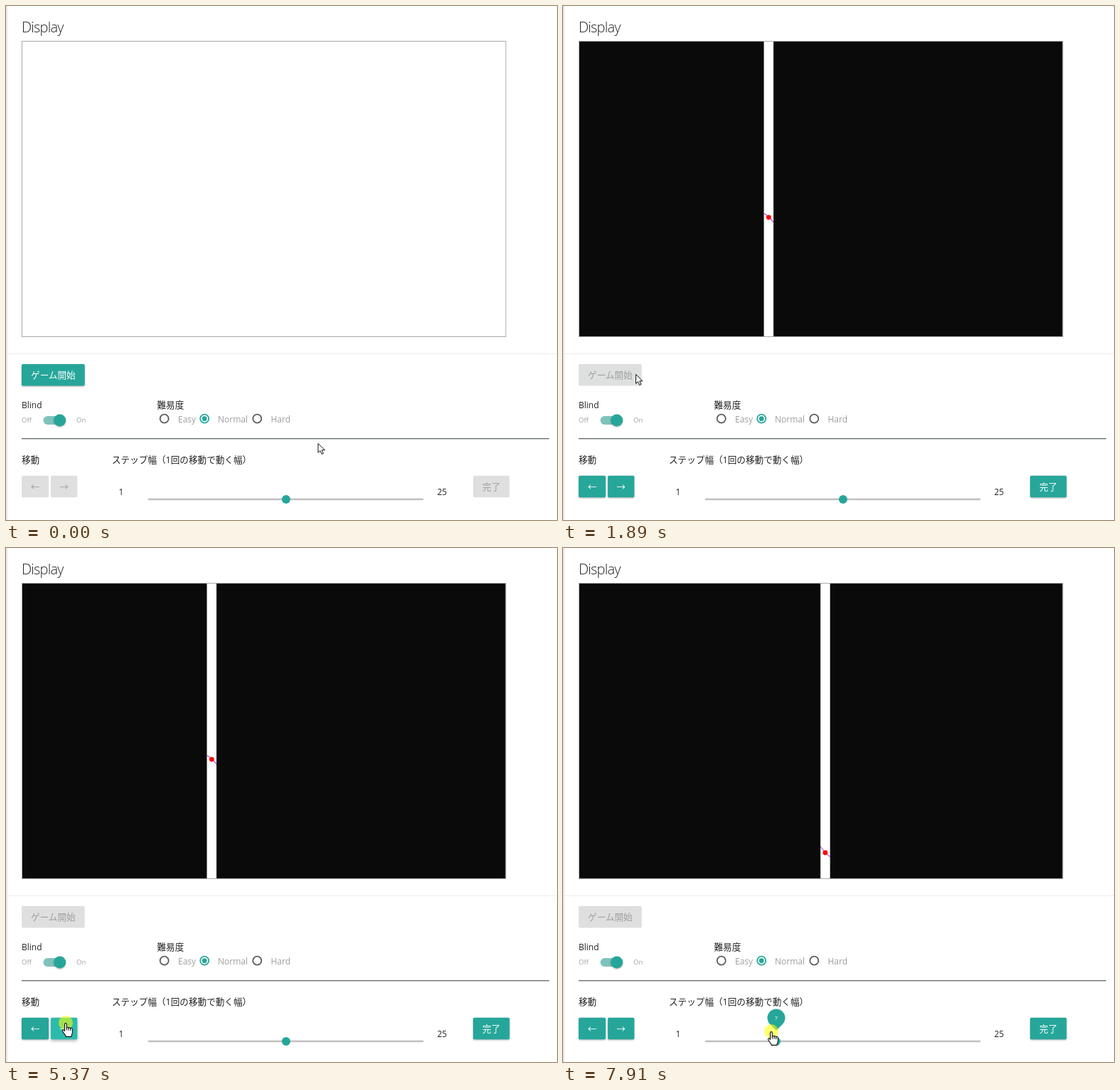
Recreate the animation shown at these times as an HTML page. Size 775x722 px, loop 8 s.

```html
<!DOCTYPE html>
<html lang="ja">
<head>
<meta charset="utf-8">
<title>Display</title>
<style>
html, body { margin: 0; width: 100%; height: 100%; overflow: hidden; background: #fff; }
svg { display: block; width: 100%; height: 100%; }
text { font: 12px "Open Sans", "Noto Sans CJK JP", "Noto Sans CJK", sans-serif; fill: #222; white-space: pre; }
text.jp { font-family: "Noto Sans CJK JP", "Noto Sans CJK", sans-serif; font-size: 12.6px; }
text.head { font-size: 20px; font-weight: 300; letter-spacing: -.8px; }
text.mid { text-anchor: middle; }
text.dim { fill: #9e9e9e; }
text.tiny { font-size: 9.5px; }
text.tip { font-size: 7.5px; fill: #fff; }
</style>
</head>
<body>
<svg viewBox="0 0 775 722" id="stage">
  <defs>
    <clipPath id="slit"><rect x="-6.75" y="50" width="13.5" height="414"/></clipPath>
  </defs>
  <rect width="775" height="722" fill="#fff"/>
  <rect width="2" height="722" fill="#e6e6e6"/>
  <rect x="2" y="488" width="773" height="1" fill="#ebebeb"/>
  <text class="head" x="22" y="37">Display</text>
  <rect x="22.5" y="49.5" width="680.5" height="415" fill="#fff" stroke="#a9a9a9"/>

  <g id="game">
    <rect x="23" y="50" width="679.5" height="414" fill="#0a0a0a"/>
    <g id="view">
      <rect x="-6.75" y="50" width="13.5" height="414" fill="#fff"/>
      <path id="curve" fill="none" stroke="#c23be0" stroke-width="1.2" clip-path="url(#slit)"/>
      <circle id="dot" r="3.4" fill="#f00"/>
    </g>
  </g>

  <text x="22" y="565">Blind</text>
  <text class="dim tiny" x="22" y="585">Off</text>
  <text class="dim tiny" x="99" y="585">On</text>
  <rect x="52.5" y="576" width="30" height="12" rx="6" fill="#7fc2bc"/>
  <circle cx="75.7" cy="582" r="8.5" fill="#26a69a" style="filter:drop-shadow(0 1px 1px rgba(0,0,0,.3))"/>

  <text class="jp" x="212.5" y="565">難易度</text>
  <g fill="none" stroke="#5a5a5a" stroke-width="1.8">
    <circle cx="222.7" cy="579.7" r="6"/>
    <circle cx="279.2" cy="579.7" r="6" stroke="#26a69a"/>
    <circle cx="353.3" cy="579.7" r="6"/>
  </g>
  <circle cx="279.2" cy="579.7" r="3.4" fill="#26a69a"/>
  <text class="dim" x="242" y="585">Easy</text>
  <text class="dim" x="298" y="585">Normal</text>
  <text class="dim" x="372.5" y="585">Hard</text>

  <rect x="22" y="607" width="742" height="1.4" fill="#69716f"/>
  <text class="jp" x="22" y="642">移動</text>
  <text class="jp" x="149" y="642">ステップ幅（<tspan font-family="Open Sans, sans-serif">1</tspan>回の移動で動く幅）</text>
  <text x="158.5" y="687">1</text>
  <text x="606.5" y="687">25</text>

  <g id="buttons"></g>

  <rect x="200" y="691.6" width="387" height="2.6" fill="#c2c0c2"/>
  <circle id="thumb" cy="693" r="6" fill="#26a69a"/>
  <path id="bubble" fill="#26a69a" d="M0 0 L-8.84 -8.84 A12.5 12.5 0 1 1 8.84 -8.84 Z"/>
  <text id="value" class="tip mid"></text>

  <circle id="press" r="10" fill="#ff0" fill-opacity=".56"/>
  <path id="arrow" fill="#fff" stroke="#111" stroke-width="1" stroke-linejoin="round"
    d="M.5 .5 V13.4 L3.5 10.6 L5.6 15.4 L7.8 14.5 L5.8 9.8 H10 Z"/>
  <g id="hand" stroke="#111" stroke-width="1.1" stroke-linejoin="round" stroke-linecap="round">
    <path fill="#fff" d="M-1.5 11.5 V2 C-1.5 .1 1.3 .1 1.3 2 V7.2 C1.5 5.8 4 5.9 4 7.4
      C4.3 6.2 6.7 6.5 6.7 8 C7.2 7 9.4 7.4 9.4 9 V13.6 C9.4 15.5 8 16.5 7.8 19.4 H.2
      C0 17.2 -2.4 15.4 -4.3 11.8 C-5 10.2 -3.3 9.2 -2.3 10.3 Z"/>
    <path fill="none" d="M1.3 7.2 V10 M4 7.6 V10.3 M6.7 8.2 V10.6"/>
  </g>
</svg>
<script>
const LOOP = 8000;
const TEAL = [38, 166, 154], HOVER = [43, 187, 173], FOCUS = [29, 125, 116];
const GREY = [223, 223, 223], WHITE = [255, 255, 255], DIM = [159, 159, 159];
const START = 1640, STEP = 5560, GRAB = 7130;

const $ = id => document.getElementById(id);
const set = (el, attrs) => { for (const k in attrs) el.setAttribute(k, attrs[k]); };
const clamp = v => Math.max(0, Math.min(1, v));
const out = p => 1 - (1 - clamp(p)) ** 3;
const smooth = p => p * p * (3 - 2 * p);
const mix = (a, b, p) => a.map((v, i) => v + (b[i] - v) * p);
const rgb = c => `rgb(${c.map(Math.round)})`;
const rise = (t, at, d = 300) => out((t - at) / d);
const span = (t, a, b, d) => rise(t, a, d) - rise(t, b, d);
const within = (t, a, b) => t >= a && t < b;
const show = (el, on) => el.setAttribute('visibility', on ? 'visible' : 'hidden');

// Pointer stops: time, x, y
const PATH = [
  [0, 438.5, 614], [10, 438.5, 614], [730, 105, 518], [850, 105, 518], [920, 102, 517],
  [2290, 102, 517], [2800, 153, 590], [3130, 142, 640], [3660, 46, 674], [3750, 46, 674],
  [3820, 46, 673], [4080, 46, 673], [4430, 84, 667], [6150, 84, 667], [6540, 445, 704],
  [6610, 445, 704], [6910, 403, 694], [7000, 403, 694], [7070, 392, 694], [7220, 392, 694],
  [7830, 297, 679], [7910, 293, 679], [LOOP, 293, 679]
];

function pointer(t) {
  const i = PATH.findIndex(k => k[0] > t);
  const [t0, x0, y0] = PATH[i - 1], [t1, x1, y1] = PATH[i];
  const p = smooth((t - t0) / (t1 - t0));
  return [x0 + (x1 - x0) * p, y0 + (y1 - y0) * p];
}

function makeButton(id, x, y, w, label, textY) {
  $('buttons').insertAdjacentHTML('beforeend', `
    <clipPath id="${id}Clip"><rect x="${x}" y="${y}" width="${w}" height="30.5" rx="1.7"/></clipPath>
    <rect id="${id}" x="${x}" y="${y}" width="${w}" height="30.5" rx="1.7"/>
    <text id="${id}Text" class="jp mid" x="${x + w / 2}" y="${textY}">${label}</text>
    <circle id="${id}Wave" fill="#fff" clip-path="url(#${id}Clip)"/>`);
  return {
    box: $(id), text: $(id + 'Text'), wave: $(id + 'Wave'),
    hit: (px, py) => px >= x && px <= x + w && py >= y && py <= y + 30.5
  };
}

const begin = makeButton('begin', 22, 503, 88.7, 'ゲーム開始', 523);
const left = makeButton('left', 22, 659.7, 38, '←', 680);
const right = makeButton('right', 63, 659.7, 37.3, '→', 680);
const done = makeButton('done', 657, 659.7, 51.3, '完了', 680);

function paint(b, on, hover = 0, focus = 0) {
  const active = mix(mix(TEAL, FOCUS, focus), HOVER, hover);
  b.box.setAttribute('fill', rgb(mix(GREY, active, on)));
  b.text.style.fill = rgb(mix(DIM, WHITE, on));
  b.box.style.filter =
    `drop-shadow(0 ${1.3 + hover * .9}px ${1.2 + hover * .7}px rgba(0,0,0,${.3 * on}))`;
}

function ripple(b, t, at, end, fade, x, y, alpha) {
  set(b.wave, {
    cx: x, cy: y,
    r: t < at ? 0 : 95 * out((t - at) / 700),
    'fill-opacity': alpha * (1 - clamp((t - end) / fade))
  });
}

function render(t) {
  const [x, y] = pointer(t);
  const on = rise(t, START);

  paint(begin, 1 - on, span(t, 600, START));
  paint(left, on, span(t, 3530, 4210));
  paint(right, on, span(t, 4260, 6190), span(t, 6190, 7180));
  paint(done, on);
  ripple(begin, t, 1460, START, 150, 102, 517, .24);
  ripple(right, t, 5450, 5930, 240, 84, 667, .19);

  const moved = t >= STEP;
  show($('game'), t >= START);
  set($('view'), { transform: `translate(${moved ? 368.9 : 289.3} 0)` });
  set($('curve'), { d: moved ? 'M-7 419 Q-1 428 7 434' : 'M-7 291 Q2 297 7 304' });
  set($('dot'), { cy: moved ? 428 : 296.8 });

  const value = t < GRAB ? 13 : Math.round((x - 206) / 15.66) + 1;
  const thumbX = 206 + 15.66 * (value - 1);
  const grow = rise(t, GRAB, 250);
  set($('thumb'), { cx: thumbX });
  set($('bubble'), { transform: `translate(${thumbX} 677.8) scale(${grow})` });
  set($('value'), { x: thumbX + (1 - grow) * 15, y: 681 - 17.7 * grow });
  $('value').textContent = value;
  show($('value'), grow > .3);

  const link = (t < START && begin.hit(x, y)) || left.hit(x, y) || right.hit(x, y) || t >= 6850;
  const at = { transform: `translate(${x} ${y})` };
  set($('arrow'), at);
  set($('hand'), at);
  show($('arrow'), !link);
  show($('hand'), link);
  set($('press'), { cx: x, cy: y });
  show($('press'), within(t, 1340, START) || within(t, 5370, STEP) || t >= GRAB);
}

const t0 = performance.now();
function tick() {
  render((performance.now() - t0) % LOOP);
  requestAnimationFrame(tick);
}
tick();
</script>
</body>
</html>
```
